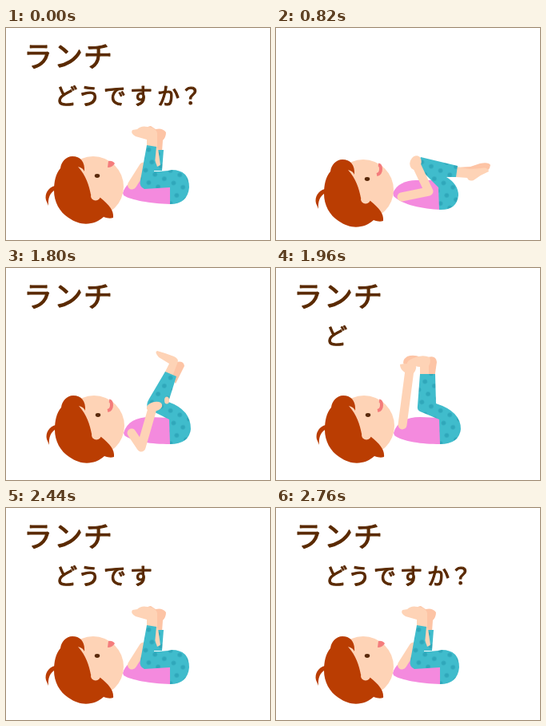
Recreate the animation shown at these times as an HTML page. Size 330x266 px, loop 2.92 s.

```html
<!DOCTYPE html>
<html lang="ja">
<head>
<meta charset="utf-8">
<title>ランチどうですか？</title>
<style>
html, body { margin: 0; width: 100%; height: 100%; overflow: hidden; background: #fff; }
svg { display: block; width: 100%; height: 100%; }

/* The cycle starts with the lying pose, 160 ms into the loop. */
.pose, text { animation: 2920ms step-end -2760ms infinite; visibility: hidden; }
.lie { animation-name: lie; }
.hug { animation-name: hug; }
.lift { animation-name: lift; }
.reach { animation-name: reach; }
.hold { animation-name: hold; }
@keyframes lie { 0% { visibility: visible } 22.602%, to { visibility: hidden } }
@keyframes hug { 0% { visibility: hidden } 22.602% { visibility: visible } 45.205%, to { visibility: hidden } }
@keyframes lift { 0% { visibility: hidden } 45.205% { visibility: visible } 61.643%, to { visibility: hidden } }
@keyframes reach { 0% { visibility: hidden } 61.643% { visibility: visible } 78.082%, to { visibility: hidden } }
@keyframes hold { 0% { visibility: hidden } 78.082%, to { visibility: visible } }

/* One more letter every 160 ms. */
@keyframes c1 { 0% { visibility: hidden } 45.205%, to { visibility: visible } }
@keyframes c2 { 0% { visibility: hidden } 50.684%, to { visibility: visible } }
@keyframes c3 { 0% { visibility: hidden } 56.164%, to { visibility: visible } }
@keyframes c4 { 0% { visibility: hidden } 61.643%, to { visibility: visible } }
@keyframes c5 { 0% { visibility: hidden } 67.123%, to { visibility: visible } }
@keyframes c6 { 0% { visibility: hidden } 72.602%, to { visibility: visible } }
@keyframes c7 { 0% { visibility: hidden } 78.082%, to { visibility: visible } }
@keyframes c8 { 0% { visibility: hidden } 83.561%, to { visibility: visible } }
@keyframes c9 { 0% { visibility: hidden } 89.041%, to { visibility: visible } }

text {
  font-family: "Noto Sans CJK JP", "Noto Sans CJK", "Noto Sans JP", sans-serif;
  text-anchor: middle;
  fill: #5a2a00; stroke: #5a2a00; stroke-width: 1.2; stroke-linejoin: round;
}
.big { font-size: 36px; }
.small { font-size: 28px; stroke-width: 1; }
.skin { fill: #fed3b6; }
.far { fill: #fdc4a5; }
.hair { fill: #ba3d02; }
.top { fill: #f48ade; }
.pants { fill: url(#dots); }
.arm { fill: none; stroke: #fed3b6; stroke-width: 11; stroke-linecap: round; stroke-linejoin: round; }
.smile { fill: none; stroke: #f47c7c; stroke-width: 4; }
.laugh { fill: #f47c7c; }
</style>
</head>
<body>
<svg viewBox="0 0 330 266">
  <defs>
    <pattern id="dots" width="20" height="16" patternUnits="userSpaceOnUse" patternTransform="translate(2 3) rotate(-14)">
      <rect width="20" height="16" fill="#40bccc"/>
      <g fill="#2fa7ba"><circle cx="5" cy="4" r="2.8"/><circle cx="15" cy="12" r="2.8"/></g>
    </pattern>
    <g id="head">
      <circle class="skin" cx="109" cy="203" r="38"/>
      <path class="hair" d="M61 202C53 204 48 212 50 220L53 227C52 218 55 210 62 207Z"/>
      <path class="hair" d="M98 184C99 172 93 165 83 165C75 165 69 172 68 180C62 187 60 197 60 208C60 222 67 235 78 242C88 249 98 251 106 249C114 248 118 244 122 241C127 243 131 243 134 242C135 233 129 226 118 217L106 213C104 202 100 189 90 178C94 179 97 181 98 184Z"/>
      <circle class="skin" cx="112" cy="214.500" r="6"/>
      <ellipse cx="114" cy="189.500" rx="3.200" ry="2.400" fill="#5a2a0a"/>
    </g>
    <path id="smile" class="smile" d="M128 171.500Q131 172 131 177Q131 183 126 184"/>
    <path id="torso" class="top" d="M147 207C151 193 163 187 180 187L205 188V221C183 221 158 218 148 210Z"/>
  </defs>

  <g class="pose lie">
    <path class="skin" d="M190 193L206 186Q211 180 216 180L218 183Q225 182 227 186Q224 191 216 191L204 196Z"/>
    <path class="far" d="M269 202L281 211L299 215Q306 218 303 222Q294 224 281 222L267 211Z"/>
    <path class="skin" d="M264 210L271 203L279 217L286 222L301 223Q305 226 301 229L290 228L278 230Q272 229 275 223Z"/>
    <path class="top" d="M146 206C149 197 155 192 164 192H203V226L180 225C165 222 148 216 147 211Z"/>
    <path class="pants" d="M203 194L223 196L243 173Q251 167 258 175L273 203L263 213L248 200L236 217Q230 226 216 226H203Z"/>
    <path class="arm" d="M155 213C164 224 176 231 188 233.500"/>
    <path class="skin" d="M184 228L212 234Q228 236 231 241Q230 245 222 245L184 239Z"/>
    <use href="#head"/><use href="#smile"/>
  </g>

  <g class="pose hug">
    <path class="far" d="M225 175L243 174L255 170Q266 168 268 172Q267 180 258 181L226 186Z"/>
    <path class="skin" d="M225 174L242 177L256 176Q265 174 266 180Q256 184 247 191Q241 193 239 188L225 187Z"/>
    <path class="top" d="M146 207C151 196 162 191 175 191H202L206 228C183 227 158 222 147 211Z"/>
    <path class="pants" d="M181 162L227 173L225 187L213 187Q228 196 228 210Q226 229 204 228L203 200L183 180Q176 168 181 162Z"/>
    <path class="arm" d="M157 212L191 205L176 173"/>
    <ellipse class="skin" cx="174.500" cy="169" rx="7" ry="9" transform="rotate(20 174.500 169)"/>
    <use href="#head"/><use href="#smile"/>
  </g>

  <g class="pose lift">
    <path class="far" d="M205 134L213 118Q222 116 223 123L212 145Z"/>
    <path class="skin" d="M198 132L204 120L191 112Q185 105 189 104L199 107L210 111Q217 114 214 120L208 136Z"/>
    <use href="#torso"/>
    <path class="pants" d="M199 130L213 136L203 168Q231 178 231 202Q229 221 205 221L204 190L178 177Q174 172 179 164Z"/>
    <path class="arm" d="M157 207L169 225L182 180" stroke-width="10"/>
    <ellipse class="skin" cx="185.500" cy="174" rx="10" ry="6" transform="rotate(-15 185.500 174)"/>
    <ellipse class="skin" cx="201" cy="166" rx="3" ry="4.500"/>
    <use href="#head" x="1" y="-5"/><use href="#smile" x="1" y="-5"/>
  </g>

  <g class="pose reach">
    <path class="far" d="M188 139L190 112Q200 109 201 118L198 139ZM160 121Q157 116 164 111Q172 108 181 112V124Z"/>
    <path class="skin" d="M180 136V124L164 121Q163 116 172 113Q183 108 192 112Q194 118 191 123V136Z"/>
    <use href="#torso"/>
    <path class="pants" d="M180 133H199L200 170Q231 180 231 202Q229 221 205 221L204 190L180 180Q176 178 177 173Z"/>
    <path class="arm" d="M158 197L167 128"/>
    <path class="skin" d="M155 121Q163 119 174 121Q177 126 172 132L161 131Q155 127 155 121Z"/>
    <use href="#head" x="1" y="-5"/><use href="#smile" x="1" y="-5"/>
  </g>

  <g class="pose hold">
    <path class="far" d="M176 130Q175 123 181 123L187 127Q196 125 200 131Q200 137 196 141L195 155H188L187 139Z"/>
    <path class="pants" d="M187 153H197L195 179H184Z"/>
    <path class="skin" d="M187 150L190 151L193 172L189 174L184 160Z"/>
    <path class="top" d="M146 207C149 197 156 192 166 191L205 194V221C180 220 156 216 147 210Z"/>
    <path class="arm" d="M157.500 197L172 174"/>
    <path class="skin" d="M176 150V140L162 136Q155 132 158 128L164 127Q169 122 177 124Q187 124 189 132V150Z"/>
    <path class="pants" d="M176 147L188 149L185 180Q198 180 207 178Q229 178 229 200Q227 221 205 221V200L173 202Q166 199 168 191Z"/>
    <use href="#head" y="-4"/>
    <path class="laugh" d="M128 167Q133 166 136 170Q133 175 127 175Z"/>
  </g>

  <g class="big">
    <text x="40" y="49" style="animation-name:c1">ラ</text>
    <text x="78" y="49" style="animation-name:c2">ン</text>
    <text x="115" y="49" style="animation-name:c3">チ</text>
  </g>
  <g class="small">
    <text x="75" y="96" style="animation-name:c4">ど</text>
    <text x="104" y="96" style="animation-name:c5">う</text>
    <text x="136" y="96" style="animation-name:c6">で</text>
    <text x="169" y="96" style="animation-name:c7">す</text>
    <text x="203" y="96" style="animation-name:c8">か</text>
    <text x="231" y="96" style="animation-name:c9">？</text>
  </g>
</svg>
</body>
</html>
```
